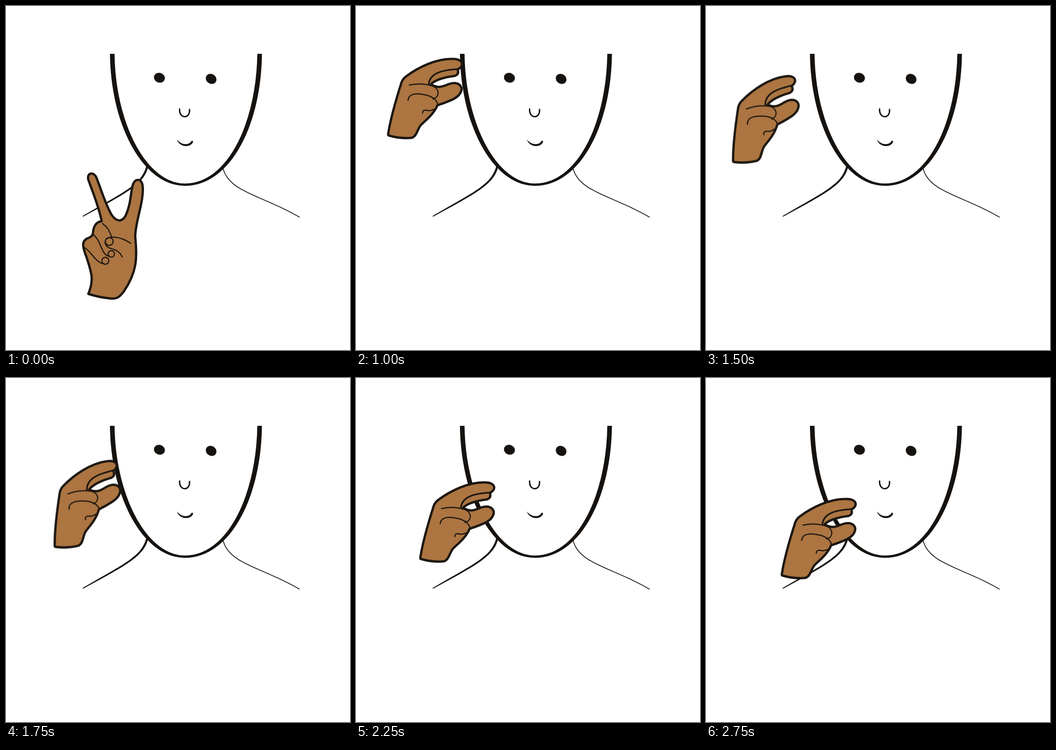
An HTML page that plays this animation: 748x748 px, repeating every 3 s.

```html
<!DOCTYPE html>
<html lang="en">
<head>
<meta charset="utf-8">
<title>Signing hand</title>
<style>
  html, body { margin: 0; width: 100%; height: 100%; overflow: hidden; background: #fff; }
  svg { display: block; width: 100%; height: 100%; }
  .ink { fill: #15120f; }
  .line { fill: none; stroke: #15120f; stroke-linecap: round; }
  .hand { fill: none; stroke: #1d1711; stroke-width: 2.5; stroke-linecap: round; stroke-linejoin: round; }
  .skin { fill: #ac7541; stroke-width: 5; }
  .edge { stroke-width: 3.6; }

  /* Two drawings of the hand; the second one tilts and hops along the cheek. */
  #peace { animation: peace 3s step-end infinite; }
  #pinch { transform-origin: 132px 160px; animation: pinch 3s step-end infinite; }
  @keyframes peace {
    25%, 100% { visibility: hidden; }
  }
  @keyframes pinch {
    0% { transform: scale(0); }
    25% { transform: none; }
    33.333% { transform: translate(-31px, 3px); }
    41.666% { transform: translate(-50.5px, 36.5px) rotate(-9deg); }
    50% { transform: translate(-60.5px, 57.5px) rotate(-9deg); }
    58.333% { transform: translate(-13.5px, 85.5px) rotate(-9deg); }
    66.666% { transform: translate(24px, 101px); }
    75% { transform: translate(39px, 115px); }
    83.333% { transform: translate(55px, 136px); }
    91.666%, 100% { transform: translate(64px, 151px); }
  }
</style>
</head>
<body>
<svg viewBox="0 0 748 748">
  <g id="person">
    <path class="ink" d="M226 104C228 262 299 391 389 391C486 391 555 262 556.5 104H546.5C544 258 480 386 389 386C307 386 238 258 236 104Z"/>
    <path class="ink" d="M305 348C294 390 255 404 166 457L168 458C260 408 300 388 309 350Z"/>
    <path class="line" stroke-width="1.7" d="M472 353C482 394 532 408 580 430Q610 443 638 459"/>
    <ellipse class="ink" cx="333.6" cy="156" rx="12" ry="10.5" transform="rotate(18 333.6 156)"/>
    <ellipse class="ink" cx="446" cy="158.5" rx="12" ry="10.5" transform="rotate(35 446 158.5)"/>
    <path class="line" stroke-width="3" d="M377.5 224C376 246 401 246 399 225"/>
    <path class="ink" d="M371.5 290C377 308 402 309 407 295Q405 291 403 294C398 303 381 303 371.5 290Z"/>
  </g>

  <g id="peace" class="hand">
    <path class="skin" d="M179 378C175 362 191 359 197 374C208 402 215 428 229 453C240 470 252 470 260 456C272 430 270 410 276 388C281 374 295 375 297 390C301 425 281 467 281 502C286 550 284 580 256 621C245 635 240 637 228 636Q204 634 179 626C192 595 186 580 175 546C166 523 163 510 180 504Q188 501 189 494C190 478 197 469 208 468C203 440 189 405 179 378Z"/>
    <path d="M210 473Q224 483 229 501M190 497C208 512 206 540 224 544M169 524C184 532 194 556 210 560"/>
    <path d="M218 507C230 498 254 504 271 516M215 514C222 536 240 520 253 546"/>
    <circle cx="224.500" cy="512" r="8.500"/>
    <circle cx="229" cy="539" r="7"/>
    <circle cx="216" cy="554" r="7.500"/>
  </g>

  <g id="pinch" class="hand">
    <path class="skin" d="M101 275Q107 235 130 163Q133 155 140 150C168 129 206 112 238 112C264 111 268 127 252 135Q256 145 246 149C222 152 204 157 194 167C210 178 222 171 232 167C252 160 263 170 260 181C256 197 236 203 208 213C200 232 184 244 172 256C163 267 163 284 148 284Q124 285 104 279Q100 279 101 275Z"/>
    <path class="edge" d="M253 134C220 136 192 142 189 167"/>
    <path d="M147 169C165 164 186 167 200 172C214 180 212 196 198 199"/>
    <path d="M144 202C146 186 164 186 185 191Q206 197 209 212M176 230Q175 222 186 224Q191 226 200 222"/>
  </g>
</svg>
</body>
</html>
```
